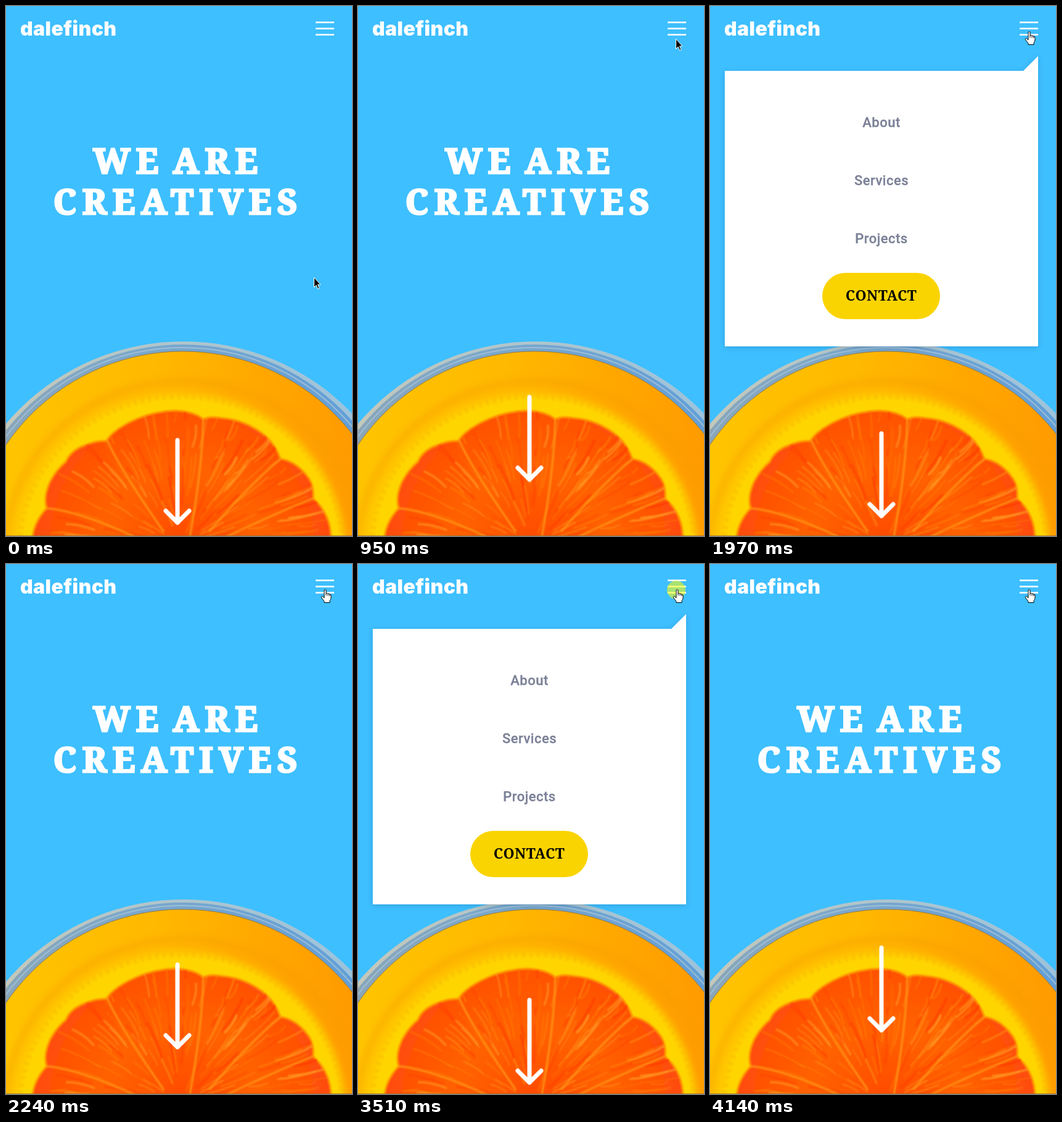
An HTML page for the animation above (4170 ms loop, 561x858 px).

```html
<!DOCTYPE html>
<html lang="en">
<head>
<meta charset="utf-8">
<title>We are creatives</title>
<style>
  html, body { margin: 0; width: 100%; height: 100%; overflow: hidden; background: #3ebfff; }
  svg { display: block; width: 100%; height: 100%; }
  text { text-anchor: middle; }
  .brand { font: 900 32px Inter, sans-serif; text-anchor: start; letter-spacing: .4px; fill: #fff; }
  .title { font: 900 56px "Noto Serif", serif; letter-spacing: 9.5px; word-spacing: -10px; fill: #fff; stroke: #fff; stroke-width: 3; }
  .link { font: 500 22px Roboto, sans-serif; letter-spacing: .5px; fill: #7b8197; stroke: #7b8197; stroke-width: .3; }
  .cta { font: 700 23px "Noto Serif", serif; letter-spacing: .4px; fill: #000; }
  .line { fill: none; stroke: #fff; stroke-linecap: round; stroke-linejoin: round; }
  .panel { filter: drop-shadow(0 2px 4px rgba(0, 40, 80, .18)); }

  /* All animations are paused and driven by one clock. */
  .arrow, .menu, .click, .pointer, .hand { animation: 4170ms linear infinite paused; }
  .arrow { animation-name: bounce; animation-duration: 1808ms; animation-delay: -184ms; }
  .menu { animation-name: menu; animation-timing-function: step-end; }
  .click { animation-name: click; animation-timing-function: step-end; }
  .pointer { animation-name: travel; }
  .hand { animation-name: hand; animation-timing-function: step-end; }

  @keyframes bounce {
    0%, 100% { transform: translateY(0); animation-timing-function: cubic-bezier(.8, 0, .9, .9); }
    50% { transform: translateY(-170px); animation-timing-function: cubic-bezier(.1, .1, .2, 1); }
  }
  @keyframes menu {
    0%, 52.5%, 85.6%, 100% { visibility: hidden; }
    31.6%, 71.2% { visibility: visible; }
  }
  @keyframes click {
    0%, 31.6%, 52.5%, 71.2%, 85.6%, 100% { visibility: hidden; }
    28.7%, 49.6%, 67.6%, 82.7% { visibility: visible; }
  }
  @keyframes travel {
    0% { transform: translate(499px, 439px); visibility: visible; animation-timing-function: ease-in-out; }
    12.9% { transform: translate(520px, 173px); animation-timing-function: ease-out; }
    22.8% { transform: translate(515px, 53px); }
    25.7% { transform: translate(516px, 45px); visibility: visible; }
    25.8%, 100% { transform: translate(516px, 45px); visibility: hidden; }
  }
  @keyframes hand {
    0% { visibility: hidden; }
    25.8%, 100% { visibility: visible; }
  }
</style>
</head>
<body>
<svg viewBox="0 0 561 858" preserveAspectRatio="none">
  <defs>
    <linearGradient id="rim" gradientUnits="userSpaceOnUse" x1="0" y1="0" x2="561" y2="0">
      <stop offset="0" stop-color="#c3c8bb"/>
      <stop offset=".35" stop-color="#b4c6c8"/>
      <stop offset="1" stop-color="#9cc3dc"/>
    </linearGradient>
    <linearGradient id="inner" gradientUnits="userSpaceOnUse" x1="0" y1="0" x2="561" y2="0">
      <stop offset="0" stop-color="#8aa6b8"/>
      <stop offset=".4" stop-color="#7ba8cc"/>
      <stop offset="1" stop-color="#629fd8"/>
    </linearGradient>
    <linearGradient id="juice" gradientUnits="userSpaceOnUse" x1="0" y1="720" x2="561" y2="640">
      <stop offset="0" stop-color="#ffc400"/>
      <stop offset=".45" stop-color="#ffb900"/>
      <stop offset="1" stop-color="#ff9a00"/>
    </linearGradient>
    <radialGradient id="pulp" gradientUnits="userSpaceOnUse" cx="285" cy="870" r="245">
      <stop offset="0" stop-color="#ff4a00"/>
      <stop offset=".5" stop-color="#ff6200"/>
      <stop offset=".85" stop-color="#ff5206"/>
      <stop offset="1" stop-color="#ff4a0a"/>
    </radialGradient>
    <filter id="soft" x="-10%" y="-10%" width="120%" height="120%"><feGaussianBlur stdDeviation="6"/></filter>
    <filter id="edge"><feGaussianBlur stdDeviation="1.2"/></filter>
    <clipPath id="glass"><circle cx="287" cy="907" r="348"/></clipPath>
    <path id="flesh" d="M43 860Q46 834 66 813Q60 796 71 771Q82 750 97 738Q104 720 128 711Q146 703 163 704
      Q170 690 200 674Q235 656 274 655Q305 656 320 669Q330 663 350 667Q390 670 422 697Q438 712 445 733
      Q472 737 492 766Q500 780 498 797Q526 822 527 860Z"/>
    <clipPath id="inside"><use href="#flesh"/></clipPath>
  </defs>

  <rect width="561" height="858" fill="#3ebfff"/>

  <g>
    <circle cx="288" cy="921" r="378" fill="url(#rim)"/>
    <circle cx="287" cy="914" r="366" fill="url(#inner)"/>
    <circle cx="287" cy="911" r="358" fill="none" stroke="#9dbfd8" stroke-width="2"/>
    <circle cx="287" cy="907" r="348" fill="url(#juice)" stroke="#98793a"/>
    <g clip-path="url(#glass)">
      <ellipse cx="287" cy="886" rx="289" ry="279" fill="none" stroke="#f79a00" stroke-width="7" opacity=".6" filter="url(#soft)"/>
      <ellipse cx="284" cy="882" rx="265" ry="253" fill="#ffd500" filter="url(#soft)"/>
      <ellipse cx="284" cy="882" rx="262" ry="250" fill="none" stroke="#f7b500" stroke-width="9" stroke-dasharray="5 7" opacity=".35" filter="url(#edge)"/>
      <use href="#flesh" fill="url(#pulp)" stroke="#ff9600" stroke-width="3" filter="url(#edge)"/>
      <g clip-path="url(#inside)" fill="none" stroke-linecap="round">
        <g id="fibres" filter="url(#edge)"></g>
        <path d="M320 668Q318 750 298 860M164 703Q185 750 255 850M445 733Q400 770 330 850M66 813Q120 818 210 860M498 797Q440 820 360 858"
          stroke="#ff9412" stroke-width="4" opacity=".75" filter="url(#edge)"/>
      </g>
    </g>
    <rect y="857" width="561" height="1" fill="#8c6a38" opacity=".7"/>
  </g>

  <text class="brand" x="23" y="48">dalefinch</text>
  <path d="M502 26.6h30m-30 10h30m-30 10h30" stroke="#fff" stroke-width="2.5"/>
  <text class="title" x="279.5" y="271">WE ARE</text>
  <text class="title" x="279.5" y="337">CREATIVES</text>

  <path class="arrow line" d="M278 706.5V840M259 821L278 840L297 821" stroke-width="7"/>

  <g class="menu">
    <path class="panel" d="M24 105H508L532 81V551H24Z" fill="#fff"/>
    <text class="link" x="278" y="196">About</text>
    <text class="link" x="278" y="290">Services</text>
    <text class="link" x="278" y="384">Projects</text>
    <rect x="182" y="432" width="191" height="75" rx="37.5" fill="#fad400"/>
    <text class="cta" x="277.5" y="477">CONTACT</text>
  </g>

  <circle class="click" cx="516" cy="42" r="15" fill="#ff0" opacity=".55"/>
  <path class="pointer" d="M.5 .5V16.5L4 13L6.7 19L9 18L6.4 12H11Z" fill="#000" stroke="#fff"/>
  <g class="hand" fill="#fff" stroke="#000" stroke-linejoin="round">
    <path d="M516 55V43Q516 41.5 517.5 41.5Q519 41.5 519 43V47.5Q521.5 46.5 522 48.3Q524.5 47.5 524.8 49.3
      Q527 49 527 51V55Q526.5 58 525 59.5V62.5H516V60.5L511.5 54.5Q510.7 52.6 512.5 52Q513.7 52 516 55Z"/>
    <path d="M519 47.5V51M522 48.3V51.5M524.8 49.3V52" fill="none"/>
  </g>
</svg>

<script>
  const LOOP = 4170;

  // Fine radial fibres in the fruit, from a seeded generator.
  let seed = 7;
  const rand = () => (seed = seed * 16807 % 2147483647) / 2147483647;
  const tones = ['#ff8a10', '#ff7a08', '#ff3a00', '#ffa028'];
  let marks = '';
  for (let i = 0; i < 150; i++) {
    const a = Math.PI * (1 + rand());
    const r = 20 + 180 * rand(), end = r + 25 + 50 * rand();
    const at = (d, bend) => `${(285 + d * Math.cos(a + bend)).toFixed(1)} ${(872 + d * Math.sin(a + bend)).toFixed(1)}`;
    marks += `<path d="M${at(r, 0)}Q${at((r + end) / 2, .03)} ${at(end, .01)}" stroke="${tones[i % 4]}"
      stroke-width="${(1.5 + 2.5 * rand()).toFixed(1)}" opacity="${(.3 + .4 * rand()).toFixed(2)}"/>`;
  }
  document.getElementById('fibres').innerHTML = marks;

  const parts = document.getAnimations();
  const start = performance.now();
  function draw() {
    const time = (performance.now() - start) % LOOP;
    for (const part of parts) part.currentTime = time;
    requestAnimationFrame(draw);
  }
  draw();
</script>
</body>
</html>
```
